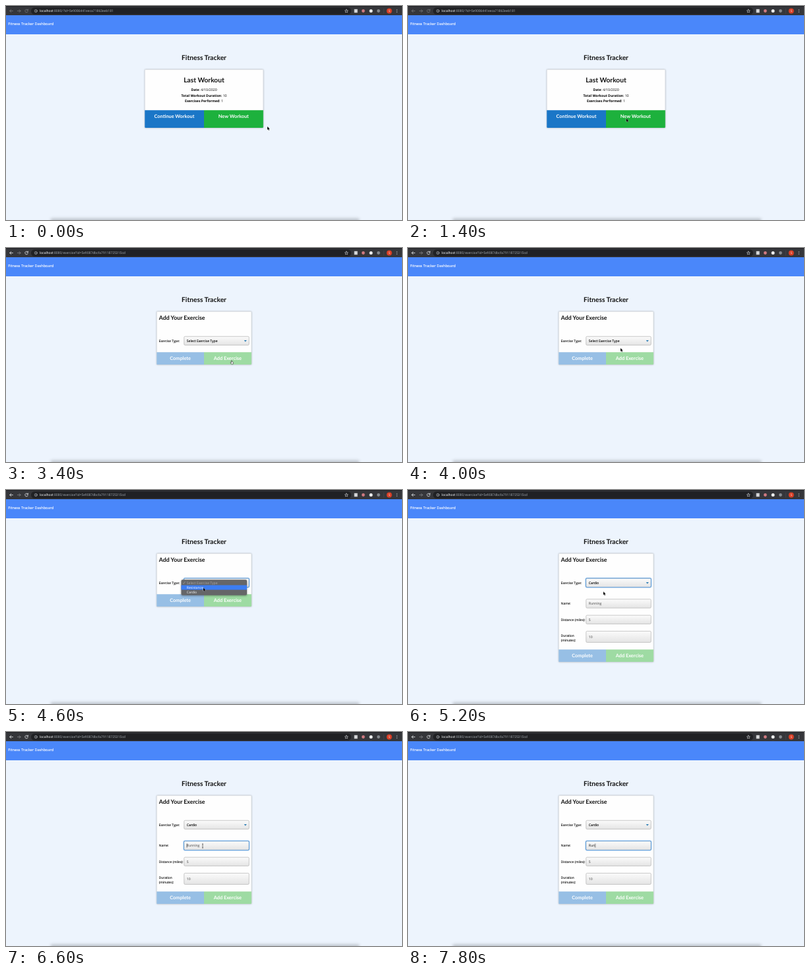
These frames come from a looping animation (600 px wide and 325 px high, 8 s). An HTML page:

```html
<!DOCTYPE html>
<html lang="en">
<head>
<meta charset="utf-8">
<title>Fitness Tracker Dashboard</title>
<style>
html, body { margin: 0; width: 100%; height: 100%; overflow: hidden; background: #edf4fd; }
svg { display: block; width: 600px; height: 325px; }
text { text-rendering: geometricPrecision; font: 500 5.05px "Open Sans", "Noto Sans", sans-serif; fill: #111; }
.mid { text-anchor: middle; }
.title { font: 700 10.2px Lato, sans-serif; }
.sub { font: 700 8.75px Lato, sans-serif; }
.btn { font: 700 7.35px Lato, sans-serif; fill: #fff; text-anchor: middle; }
.brand { font-size: 5.6px; fill: #fff; stroke: #fff; stroke-width: .12px; }
.info { font-size: 5.15px; fill: #000; }
.info tspan { font-weight: 700; }
.label { font-size: 4.85px; fill: #000; stroke: #000; stroke-width: .1px; }
.value { fill: #000; stroke: #000; stroke-width: .1px; }
.url { font: 5.07px Roboto, sans-serif; fill: #9aa0a6; }
.url tspan { fill: #f1f3f4; }
.hint { fill: #666; stroke: #666; stroke-width: .1px; }
.menu text { fill: #fff; }
.line { fill: none; stroke-width: .8; stroke-linecap: round; stroke-linejoin: round; }
.card { fill: #fefefe; stroke: #cfd3d8; stroke-width: .6; filter: drop-shadow(0 .5px 1px rgba(0, 0, 0, .25)); }
.field { fill: url(#gloss); stroke: #b3b3b3; stroke-width: .7; }
.ring { fill: none; stroke: #68a4de; stroke-width: 1.3; }
.dock { fill: #8f959c; opacity: .5; filter: blur(2px); }

/* 2.5% is 200 ms */
.a { animation: 8s step-end infinite; }
.home { animation-name: home; }
.form { animation-name: form; }
.nav { stroke: #77797d; animation-name: nav; }
.fwd { stroke: #77797d; animation-name: fwd; }
.hover { animation-name: hover; }
.menu { animation-name: menu; }
.item1 { animation-name: item1; }
.item2 { animation-name: item2; }
.unset { animation-name: unset-type; }
.picked { animation-name: picked; }
.grow { animation-name: grow; }
.drop { animation-name: drop; }
.typeRing { animation-name: type-ring; }
.nameRing { animation-name: name-ring; }
.nameHint { animation-name: name-hint; }
.k1 { animation-name: k1; }
.k2 { animation-name: k2; }
.k3 { animation-name: k3; }
.caret { animation-name: caret; }
.pointer { animation-name: pointer; }
.arrow { animation-name: arrow; }
.hand { animation-name: hand; }
.beam { animation-name: beam; }

@keyframes home { 0% { opacity: 1 } 40%, 100% { opacity: 0 } }
@keyframes form { 0% { opacity: 0 } 40%, 100% { opacity: 1 } }
@keyframes nav { 0% { stroke: #77797d } 27.5%, 100% { stroke: #e8eaed } }
@keyframes fwd { 0% { stroke: #77797d } 27.5% { stroke: #e8eaed } 40%, 100% { stroke: #85878b } }
@keyframes hover { 0% { fill: #1db13d } 35%, 100% { fill: #129b2d } }
@keyframes menu { 0% { opacity: 0 } 52.5% { opacity: 1 } 65%, 100% { opacity: 0 } }
@keyframes item1 { 0% { opacity: 0 } 57.5% { opacity: 1 } 62.5%, 100% { opacity: 0 } }
@keyframes item2 { 0% { opacity: 0 } 62.5%, 100% { opacity: 1 } }
@keyframes unset-type { 0% { opacity: 1 } 65%, 100% { opacity: 0 } }
@keyframes picked { 0% { opacity: 0 } 65%, 100% { opacity: 1 } }
@keyframes grow { 0% { height: 80.5px } 65%, 100% { height: 164.5px } }
@keyframes drop { 0% { transform: none } 65%, 100% { transform: translateY(84px) } }
@keyframes type-ring { 0% { opacity: 0 } 52.5% { opacity: 1 } 82.5%, 100% { opacity: 0 } }
@keyframes name-ring { 0% { opacity: 0 } 82.5%, 100% { opacity: 1 } }
@keyframes name-hint { 0% { opacity: 1 } 92.5%, 100% { opacity: 0 } }
@keyframes k1 { 0% { fill-opacity: 0 } 92.5%, 100% { fill-opacity: 1 } }
@keyframes k2 { 0% { fill-opacity: 0 } 95%, 100% { fill-opacity: 1 } }
@keyframes k3 { 0% { fill-opacity: 0 } 97.5%, 100% { fill-opacity: 1 } }
@keyframes caret {
  0% { opacity: 0; transform: none }
  82.5% { opacity: 1; transform: none }
  87.5% { opacity: 0; transform: none }
  92.5% { opacity: 1; transform: translateX(3.2px) }
  95% { opacity: 1; transform: translateX(6.3px) }
  97.5%, 100% { opacity: 1; transform: translateX(9.4px) }
}
@keyframes pointer {
  0% { transform: translate(396px, 183px) }
  2.5% { transform: translate(391px, 182px) }
  5% { transform: translate(377px, 179px) }
  7.5% { transform: translate(358px, 175px) }
  10% { transform: translate(343px, 172px) }
  12.5% { transform: translate(334px, 171px) }
  15% { transform: translate(330.7px, 170.7px) }
  35% { transform: translate(342px, 170.5px) }
  50% { transform: translate(322px, 152px) }
  52.5% { transform: translate(302px, 142px) }
  57.5% { transform: translate(299px, 148.5px) }
  60% { transform: translate(298px, 150px) }
  62.5% { transform: translate(296px, 154.3px) }
  72.5% { transform: translate(296px, 156px) }
  75% { transform: translate(296.5px, 160px) }
  77.5% { transform: translate(297px, 164px) }
  80% { transform: translate(297.5px, 168px) }
  82.5%, 100% { transform: translate(298px, 170px) }
}
@keyframes arrow { 0% { opacity: 1 } 35% { opacity: 0 } 50% { opacity: 1 } 82.5%, 100% { opacity: 0 } }
@keyframes hand { 0% { opacity: 0 } 35% { opacity: 1 } 50%, 100% { opacity: 0 } }
@keyframes beam { 0% { opacity: 0 } 82.5% { opacity: 1 } 92.5%, 100% { opacity: 0 } }
</style>
</head>
<body>
<svg viewBox="0 0 600 325">
  <defs>
    <linearGradient id="gloss" x2="0" y2="1">
      <stop stop-color="#fbfbfb"/><stop offset="1" stop-color="#e4e4e4"/>
    </linearGradient>
  </defs>

  <rect width="600" height="325" fill="#edf4fd"/>
  <rect x="68" y="322.5" width="467" height="8" class="dock"/>
  <rect y="14" width="600" height="29" fill="#4a87fa"/>
  <text x="3.3" y="29.2" class="brand">Fitness Tracker Dashboard</text>

  <!-- browser bar -->
  <rect width="600" height="14" fill="#35363a"/>
  <rect width="600" height="1" fill="#202124"/>
  <rect x="38" y="2.3" width="485" height="10.4" rx="5.2" fill="#202124"/>
  <g class="line">
    <path class="a nav" d="M10.4 7.5H5.8M7.8 5.4L5.7 7.5l2.1 2.1"/>
    <path class="a fwd" d="M17.4 7.5H22M20 5.4l2.1 2.1L20 9.6"/>
    <path class="a nav" d="M33.1 6.3a2.3 2.3 0 1 0 .2 1.9M33.3 5v1.6h-1.6"/>
    <circle cx="45.3" cy="7.5" r="2.1" stroke="#bdc1c6" stroke-width=".6"/>
    <path d="M45.3 7.4v1.1M45.3 6.3v.1" stroke="#bdc1c6" stroke-width=".6"/>
    <path d="M515.8 5.1l.7 1.6 1.8.2-1.3 1.2.4 1.8-1.6-.9-1.6.9.4-1.8-1.3-1.2 1.8-.2z" stroke="#dadce0" stroke-width=".6"/>
    <path d="M572.3 4v7" stroke="#55575b" stroke-width=".5"/>
  </g>
  <text x="51" y="9.3" class="url a home"><tspan>localhost</tspan>:8080/?id=5e9086441eeca71863eeb181</text>
  <text x="51" y="9.3" class="url a form"><tspan>localhost</tspan>:8080/exercise?id=5e9087dbcfa79118725315cd</text>
  <rect x="527.6" y="4.8" width="5" height="5.4" fill="#d5d6d8"/>
  <circle cx="541.3" cy="7.5" r="2.4" fill="#cf7a80"/>
  <circle cx="553" cy="7.5" r="2.5" fill="#eceded"/>
  <circle cx="564.4" cy="7.5" r="2.4" fill="#85898e"/>
  <circle cx="580.7" cy="7.5" r="4" fill="#d93f26"/>
  <text x="580.7" y="9.2" class="mid" style="font-size:4.6px;fill:#fff">S</text>
  <g fill="#dadce0">
    <circle cx="592.2" cy="5.5" r=".55"/><circle cx="592.2" cy="7.5" r=".55"/><circle cx="592.2" cy="9.5" r=".55"/>
  </g>

  <text x="300" y="81.5" class="title mid">Fitness Tracker</text>

  <!-- last workout -->
  <g class="a home">
    <rect x="210.3" y="96.6" width="179.5" height="88.4" rx="1.2" class="card"/>
    <text x="300" y="116" class="title mid">Last Workout</text>
    <g class="mid">
      <text x="300" y="129" class="info"><tspan>Date</tspan>: 4/10/2020</text>
      <text x="300" y="137.5" class="info"><tspan>Total Workout Duration</tspan>: 10</text>
      <text x="300" y="146" class="info"><tspan>Exercises Performed</tspan>: 1</text>
    </g>
    <path d="M210.3 158.3H300V185H211.5a1.2 1.2 0 0 1-1.2-1.2z" fill="#1a76c7"/>
    <path class="a hover" d="M300 158.3h89.8v25.5a1.2 1.2 0 0 1-1.2 1.2H300z" fill="#1db13d"/>
    <text x="255" y="170.4" class="btn">Continue Workout</text>
    <text x="344.8" y="170.4" class="btn">New Workout</text>
  </g>

  <!-- exercise form -->
  <g class="a form">
    <rect x="228.3" y="96.6" width="143.6" height="80.5" rx="1.2" class="card a grow"/>
    <text x="231.8" y="108.6" class="sub">Add Your Exercise</text>
    <text x="231.8" y="142.9" class="label">Exercise Type:</text>
    <rect x="269.8" y="134.3" width="98.4" height="13.2" rx="1.5" class="field"/>
    <path d="M360.6 140h4.2l-2.1 2.4z" fill="#2f7fb5"/>
    <text x="273.8" y="142.8" class="value a unset">Select Exercise Type</text>
    <text x="273.8" y="142.8" class="value a picked">Cardio</text>
    <rect x="269.3" y="133.9" width="99.2" height="14" rx="1.8" class="ring a typeRing"/>

    <g class="a picked">
      <text x="231.8" y="174.4" class="label">Name:</text>
      <text x="231.8" y="198.8" class="label">Distance (miles):</text>
      <text x="231.8" y="223" class="label">Duration</text>
      <text x="231.8" y="229.6" class="label">(minutes):</text>
      <rect x="269.8" y="165.8" width="98.4" height="13.4" rx="1.5" class="field"/>
      <rect x="269.8" y="190.2" width="98.4" height="13.2" rx="1.5" class="field"/>
      <rect x="269.8" y="214.4" width="98.4" height="17" rx="1.5" class="field"/>
      <text x="273.8" y="174.3" class="hint a nameHint">Running</text>
      <text x="273.8" y="198.7" class="hint">5</text>
      <text x="273.8" y="224.8" class="hint">10</text>
      <rect x="269.3" y="165.4" width="99.2" height="14.2" rx="1.8" class="ring a nameRing"/>
      <text x="273.8" y="174.3"><tspan class="a k1">R</tspan><tspan class="a k2">u</tspan><tspan class="a k3">n</tspan></text>
      <rect x="273.8" y="169.5" width=".6" height="6" fill="#111" class="a caret"/>
    </g>

    <g class="a drop">
      <path d="M228.3 158.3H300V177.1H229.5a1.2 1.2 0 0 1-1.2-1.2z" fill="#97bfe5"/>
      <path d="M300 158.3h71.9v17.6a1.2 1.2 0 0 1-1.2 1.2H300z" fill="#9edba3"/>
      <text x="264.1" y="170.3" class="btn">Complete</text>
      <text x="335.9" y="170.3" class="btn">Add Exercise</text>
    </g>

    <g class="menu a">
      <rect x="265.5" y="136.2" width="99.5" height="23.6" rx="1.8" fill="#656668" style="filter:drop-shadow(0 1px 1.5px rgba(0,0,0,.35))"/>
      <rect x="265.5" y="144.5" width="99.5" height="7" fill="#3c7df2" class="a item1"/>
      <rect x="265.5" y="151.4" width="99.5" height="7" fill="#3c7df2" class="a item2"/>
      <path d="M268.2 141.2l1.1 1.3 1.9-3.2" class="line" stroke="#a8a8aa" style="stroke-width:.6"/>
      <text x="273.8" y="142.8" style="fill:#a8a8aa">Select Exercise Type</text>
      <text x="273.8" y="149.8">Resistance</text>
      <text x="273.8" y="156.6">Cardio</text>
    </g>
  </g>

  <g class="a pointer" stroke-linejoin="round">
    <path class="a arrow" d="M0 0V5.1L1.2 4 2 5.9 2.9 5.5 2.1 3.7H3.7z" fill="#000" stroke="#fff" stroke-width=".5" paint-order="stroke"/>
    <path class="a hand" d="M-.7 .5q.5-.6 1 0V2.3l1.7.4q.6.2.5.9L2.1 5.8H-.6L-2 3.7q0-.8.6-.5l.7.6z" fill="#fff" stroke="#222" stroke-width=".6"/>
    <path class="a beam" d="M-1 0H1M0 0V6M-1 6H1" stroke="#222" stroke-width=".6"/>
  </g>
</svg>
</body>
</html>
```
